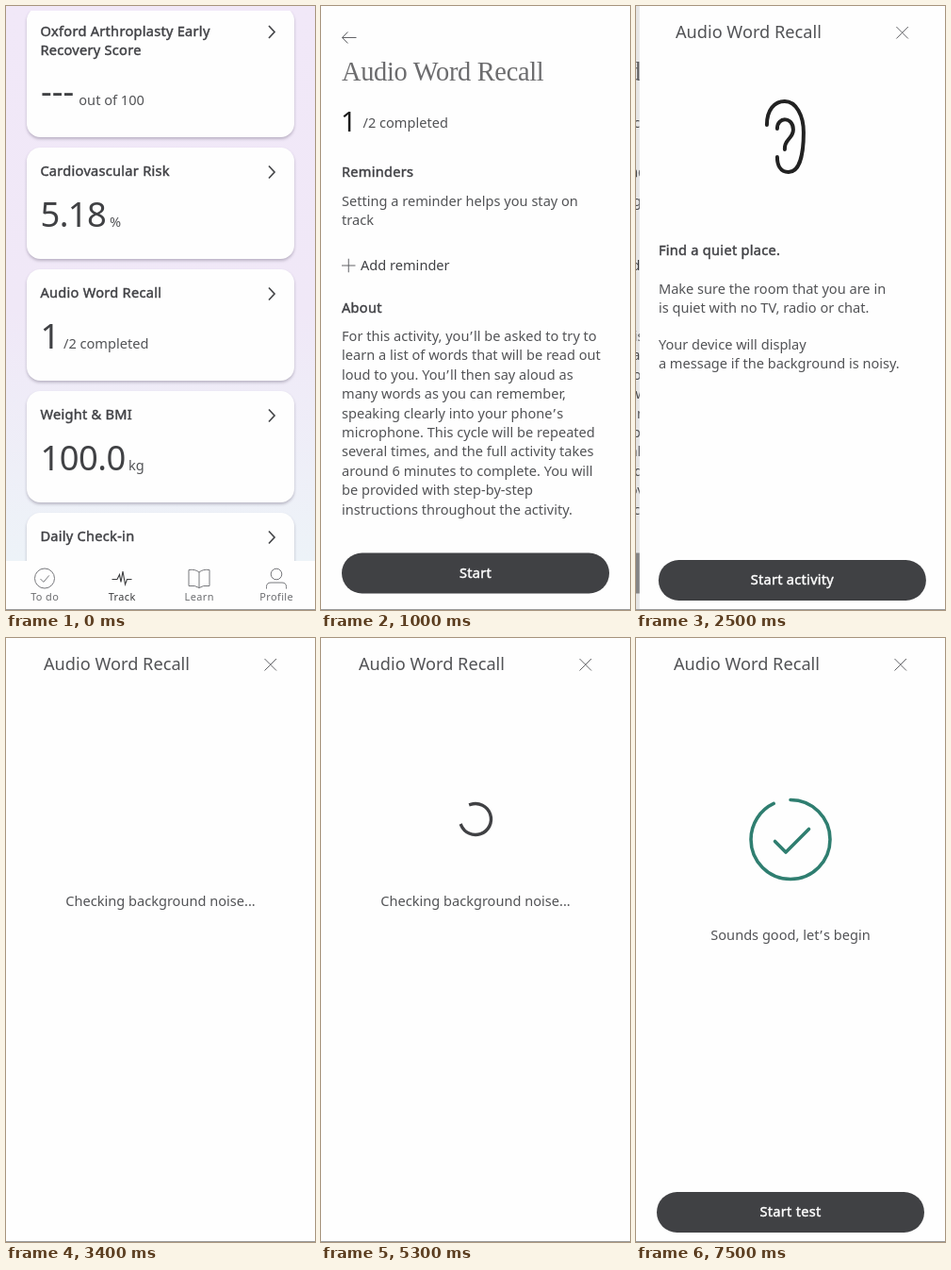
These frames come from a looping animation (328x640 px, 8 s). An HTML page:

```html
<!DOCTYPE html>
<html lang="en">
<head>
<meta charset="utf-8">
<title>Audio Word Recall</title>
<style>
  html, body { margin: 0; width: 100%; height: 100%; overflow: hidden; background: #fefefe; }
  #stage { display: block; width: 328px; height: 640px; }
  text { font: 14.58px "Noto Sans", "Open Sans", sans-serif; fill: #525356; white-space: pre; }
  .bold, .label { letter-spacing: .27px; stroke-width: .45px; }
  .bold { fill: #404145; stroke: #404145; }
  .label { fill: #fefefe; stroke: #fefefe; text-anchor: middle; }
  .big { font-size: 36.4px; fill: #404144; letter-spacing: -.55px; }
  .none { letter-spacing: 0; }
  .head { font-size: 18.2px; }
  .serif { font: 28.4px "Liberation Serif", serif; letter-spacing: -.3px; fill: #6c6c6e; }
  .mid { text-anchor: middle; }
  .apos { letter-spacing: 1.2px; }
  .tab { font-size: 10.94px; letter-spacing: .4px; text-anchor: middle; fill: #6c6d70; }
  .on { fill: #3a3b3d; }
  .line { fill: none; stroke: #626367; stroke-width: 1; }
  .icons { stroke: #77787c; }
  .card { fill: #fefefe; filter: drop-shadow(0 2px 1.5px rgba(50, 40, 70, .28)); }
  .page { fill: #fefefe; }
  .pill { fill: #404144; }
  .tick { fill: none; stroke: #2f7e70; stroke-width: 3.6; stroke-linecap: round; stroke-linejoin: round; }
</style>
</head>
<body>
<svg id="stage" viewBox="0 0 328 640">
  <defs>
    <linearGradient id="sky" x1="0" y1="0" x2="0" y2="1">
      <stop offset="0" stop-color="#f1e8f8"/>
      <stop offset=".5" stop-color="#f0e8f7"/>
      <stop offset=".92" stop-color="#edf3f8"/>
    </linearGradient>
    <clipPath id="view"><rect y="5" width="328" height="583"/></clipPath>
    <path id="chev" d="M279 21l6 6.500-6 6.500" fill="none" stroke="#46474a" stroke-width="1.700"/>
    <g id="card">
      <rect class="card" x="22" width="284" height="118" rx="14.500"/>
      <use href="#chev" y="-1.500"/>
    </g>
    <rect id="pill" class="pill" x="22" width="284" height="43" rx="21.500"/>
  </defs>

  <g id="list">
    <rect width="328" height="640" fill="url(#sky)"/>
    <g clip-path="url(#view)">
      <rect class="card" x="22" y="1" width="284" height="138" rx="14.500"/>
      <use href="#chev"/>
      <text class="bold" x="36.400" y="32">Oxford Arthroplasty Early</text>
      <text class="bold" x="36.400" y="52">Recovery Score</text>
      <text class="big none" x="37" y="102.500">---</text>
      <text x="77.300" y="105">out of 100</text>

      <use href="#card" y="150"/>
      <text class="bold" x="36.400" y="180">Cardiovascular Risk</text>
      <text class="big" x="36.400" y="234">5.18</text>
      <text x="110" y="234">%</text>

      <use href="#card" y="279"/>
      <text class="bold" x="36.400" y="309">Audio Word Recall</text>
      <text class="big" x="36.400" y="363">1</text>
      <text x="61" y="362.500">/2 completed</text>
      <rect id="press" x="22" y="279" width="284" height="118" rx="14.500"/>

      <use href="#card" y="408"/>
      <text class="bold" x="36.400" y="438">Weight &amp; BMI</text>
      <text class="big" x="36.400" y="492">100.0</text>
      <text x="130" y="492">kg</text>

      <use href="#card" y="537"/>
      <text class="bold" x="36.400" y="567">Daily Check-in</text>
    </g>
    <rect class="page" y="588" width="328" height="52"/>
    <g class="line icons">
      <circle cx="41" cy="606.500" r="10.500"/>
      <path d="M36.500 607l3.300 3.400 6-7"/>
      <path stroke="#3a3b3d" stroke-width="1.100" d="M112.500 607.500h5.500l2.500-5 1.500 8 2-11.500 2.500 14 2-5.500h5"/>
      <path d="M205 600q-4-3.500-11-2.500v17q7-1 11 2 4-3 11-2v-17q-7-1-11 2.500v17"/>
      <circle cx="287" cy="602" r="5.800"/>
      <path d="M276.500 617.500v-2q0-4.500 4.500-4.500h12q4.500 0 4.500 4.500v2"/>
    </g>
    <text class="tab" x="41.200" y="630">To do</text>
    <text class="tab on" x="123.200" y="630">Track</text>
    <text class="tab" x="205.200" y="630">Learn</text>
    <text class="tab" x="287.200" y="630">Profile</text>
  </g>
  <rect id="listDim" width="328" height="640"/>

  <svg id="detail" width="328" height="640"><g id="detailBody">
    <rect class="page" x="-10" width="500" height="640"/>
    <path class="line" d="M37.500 33.500h-15m6-6l-6 6 6 6"/>
    <text class="serif" x="22" y="79">Audio Word Recall</text>
    <text id="count" x="21" y="133" style="font-size:29.16px;fill:#1c1c1c">1</text>
    <text id="outOf" y="129">/2 completed</text>
    <text class="bold" x="22" y="181">Reminders</text>
    <text x="22" y="212">Setting a reminder helps you stay on</text>
    <text x="22" y="231.500">track</text>
    <path class="line" d="M22 275h14.500m-7.250-7.250v14.500"/>
    <text x="42" y="280" style="fill:#404145">Add reminder</text>
    <text class="bold" x="22" y="324.500">About</text>
    <g id="about"></g>
    <use id="start" href="#pill" y="579.500"/>
    <text class="label" x="164" y="606">Start</text>
  </g></svg>
  <rect id="detailDim" width="328" height="640"/>

  <svg id="test" width="328" height="640"><g id="testBody">
    <rect class="page" x="-10" width="500" height="640"/>
    <text class="head" x="40" y="34">Audio Word Recall</text>
    <path class="line" d="M274.500 22l12.500 12.500m0-12.500l-12.500 12.500"/>
    <g id="prep">
      <path d="M137 126C137 110 145 101 156 101C168 101 176 116 176 134C176 156 172 176 160 176C151 176 148 168 148 160M148 130C148 117 165 117 165 131C165 141 155 141 156 152"
        fill="none" stroke="#222" stroke-width="4" stroke-linecap="round"/>
      <text class="bold" x="22" y="264">Find a quiet place.</text>
      <text x="22" y="305">Make sure the room that you are in</text>
      <text x="22" y="325">is quiet with no TV, radio or chat.</text>
      <text x="22" y="364">Your device will display</text>
      <text x="22" y="384">a message if the background is noisy.</text>
      <use href="#pill" y="587"/>
      <text class="label" x="164" y="613">Start activity</text>
    </g>
    <g id="check">
      <circle id="spin" cx="164" cy="192" r="16.500" pathLength="1" fill="none" stroke="#404144" stroke-width="3.400" stroke-linecap="square"/>
      <text class="mid" x="164" y="283.500">Checking background noise...</text>
    </g>
    <g id="done">
      <circle id="ring" class="tick" cx="164" cy="213.500" r="42" pathLength="1" transform="rotate(-90 164 213.500)"/>
      <path id="mark" class="tick" pathLength="1" d="M147.500 215.500l11.500 11.500 24.500-24.500"/>
      <text class="mid" x="164" y="320">Sounds good, let<tspan class="apos" dx=".8">’</tspan>s begin</text>
      <use href="#pill" y="587"/>
      <text class="label" x="164" y="613">Start test</text>
    </g>
  </g></svg>
  <rect y="639" width="328" height="1" fill="#9b9b9b"/>
</svg>
<script>
  const LOOP = 8000, STEP = 100, W = 328;
  const $ = id => document.getElementById(id);
  const clamp = v => Math.min(1, Math.max(0, v));
  const set = (id, name, value) => $(id).setAttribute(name, value);
  const show = (id, on) => { $(id).style.display = on ? '' : 'none'; };

  $('about').innerHTML = [
    'For this activity, you’ll be asked to try to',
    'learn a list of words that will be read out',
    'loud to you. You’ll then say aloud as',
    'many words as you can remember,',
    'speaking clearly into your phone’s',
    'microphone. This cycle will be repeated',
    'several times, and the full activity takes',
    'around 6 minutes to complete. You will',
    'be provided with step-by-step',
    'instructions throughout the activity.'
  ].map((s, i) => `<text x="22" y="${355 + i * 20.4}">${s}</text>`).join('')
    .replace(/’/g, '<tspan class="apos" dx=".8">’</tspan>');

  // Cubic Bezier easing, solved by bisection
  function bezier(x, x1, y1, x2, y2) {
    const at = (u, a, b) => 3 * a * u * (1 - u) ** 2 + 3 * b * u * u * (1 - u) + u ** 3;
    let lo = 0, hi = 1;
    for (let i = 0; i < 24; i++) {
      const m = (lo + hi) / 2;
      if (at(m, x1, x2) < x) lo = m; else hi = m;
    }
    return at(lo, y1, y2);
  }

  // Fast out, extra slow in
  function slide(ms) {
    const x = clamp(ms / 450), k = 1 / 6;
    const p = x <= 0 ? 0
      : x < k ? .4 * bezier(x / k, .3, 0, .8, .15)
      : .4 + .6 * bezier((x - k) / (1 - k), .05, .7, .1, 1);
    return p > .99 ? 1 : p;
  }

  // The new page is uncovered from the right while the old one drifts left
  function push(oldBody, dim, page, body, p) {
    show(page, p > 0);
    set(oldBody, 'transform', `translate(${-.2 * W * p})`);
    set(dim, 'opacity', .1 * p);
    set(page, 'x', W * (1 - p));
    set(body, 'transform', `translate(${-W / 2 * (1 - p)})`);
  }

  function dash(id, len) {
    show(id, len > 0);
    set(id, 'stroke-dasharray', `${len} 2`);
  }

  function spinner(ms) {
    const x = (ms % 1333) / 1333;
    const trim = v => .75 * bezier(clamp(v), .4, 0, .2, 1);
    const tail = trim(2 * x - 1), head = trim(2 * x);
    const turn = 360 * (tail + x / 4) + 720 * ms / 4444 - 90;
    dash('spin', ms > 0 ? head - tail : 0);
    set('spin', 'transform', `rotate(${turn} 164 192)`);
  }

  function draw(t) {
    push('list', 'listDim', 'detail', 'detailBody', slide(t - 623));
    const p = slide(t - 2178);
    if (p > 0) push('detailBody', 'detailDim', 'test', 'testBody', p);
    else { show('test', false); set('detailDim', 'opacity', 0); }

    set('press', 'opacity', .2 * clamp((t - 400) / 200));
    set('start', 'opacity', 1 - .44 * clamp((t - 1900) / 200));
    const loaded = t >= 900;
    show('count', loaded);
    set('outOf', 'x', loaded ? 44.5 : 28);

    show('prep', t < 3400);
    show('check', t >= 3400 && t < 7000);
    show('done', t >= 7000);
    spinner(Math.max(0, t - 3420));
    const q = clamp((t - 6950) / 550);
    dash('ring', .93 * bezier(clamp(q / .8), .4, 0, .2, 1));
    dash('mark', clamp((q - .5) / .5));
  }

  const t0 = performance.now();
  function tick() {
    const t = (performance.now() - t0 + 8) % LOOP;
    draw(Math.floor(t / STEP) * STEP);
    requestAnimationFrame(tick);
  }
  tick();
</script>
</body>
</html>
```
